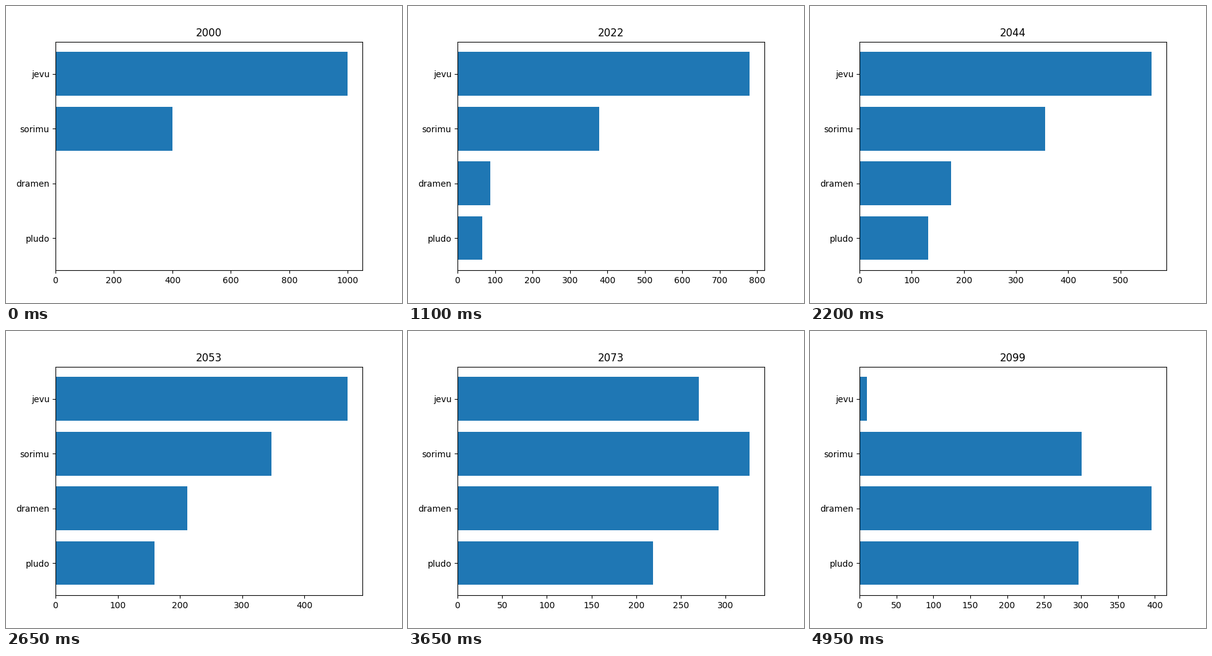
Recreate the animation shown at these times as a matplotlib script. Size 640x480 px, loop 5000 ms.

```python
import matplotlib.pyplot as plt
from matplotlib.animation import FuncAnimation

FRAMES = 100
INTERVAL = 50  # ms
START_YEAR = 2000

# name, starting value, change per year (bottom bar first)
BRANDS = [
    ("pludo", 0, 3),
    ("dramen", 0, 4),
    ("sorimu", 400, -1),
    ("jevu", 1000, -10),
]
NAMES = [name for name, _, _ in BRANDS]

plt.rcParams["font.family"] = "DejaVu Sans"
fig, ax = plt.subplots(figsize=(6.4, 4.8), dpi=100)


def draw(year):
    ax.clear()
    values = [start + step * year for _, start, step in BRANDS]
    ax.barh(NAMES, values, color="#1f77b4")
    ax.set_title(str(START_YEAR + year))


anim = FuncAnimation(fig, draw, frames=FRAMES, interval=INTERVAL,
                     init_func=lambda: draw(0), repeat=True, repeat_delay=0)
plt.show()
```
